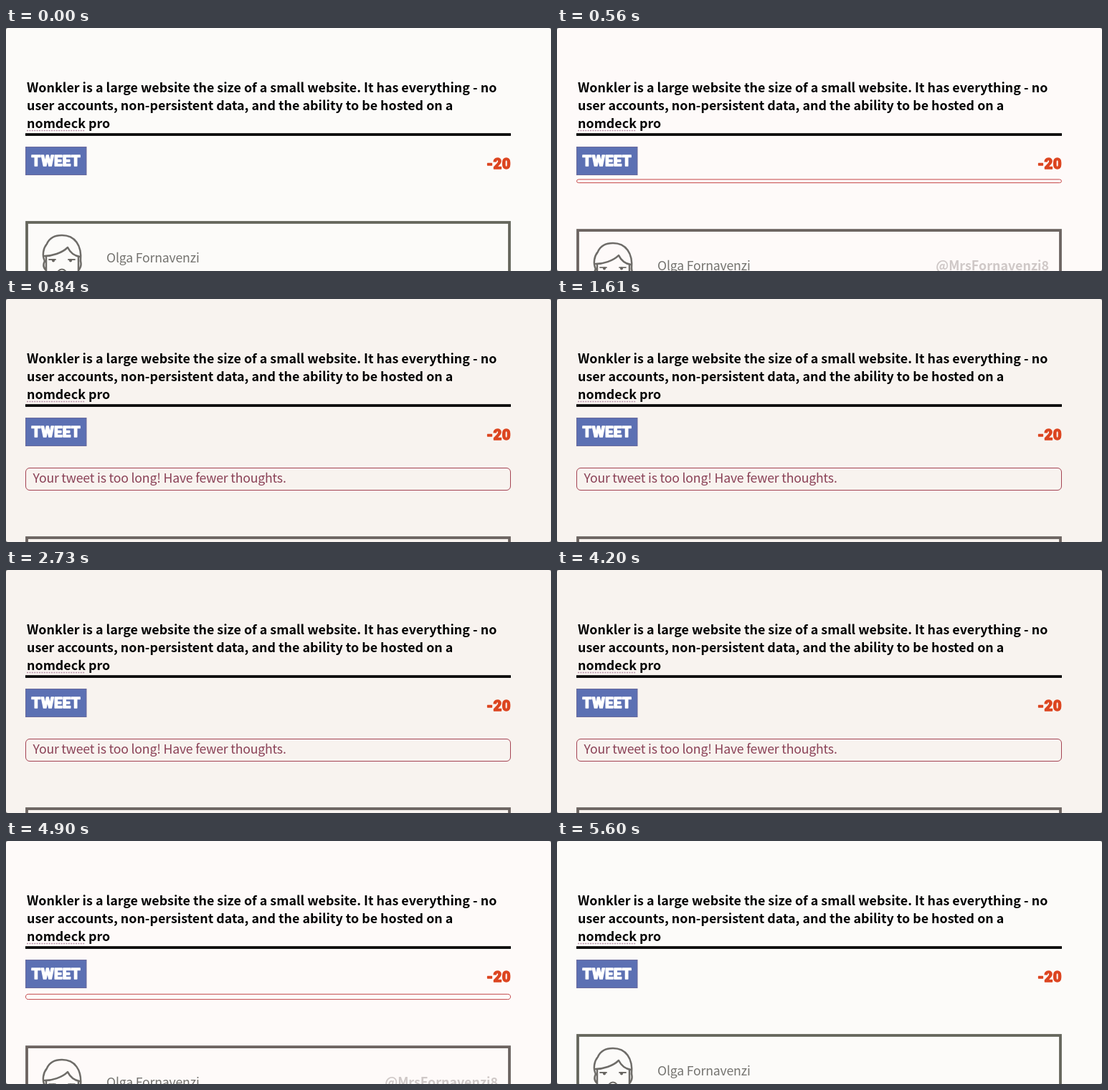
Write an HTML page that moves like this. It is 760 by 340 pixels and loops after 5.67 s.

```html
<!DOCTYPE html>
<html lang="en">
<head>
<meta charset="utf-8">
<title>Message too long</title>
<style>
  html, body { margin: 0; width: 100%; height: 100%; overflow: hidden; background: #777; }
  svg { display: block; width: 760px; height: 340px; border-radius: 3px; }
  text { font: 300 17.7px "Noto Sans CJK SC", "Noto Sans CJK JP", "Noto Sans CJK KR", sans-serif; letter-spacing: -.2px; }
  .bold { font-weight: 700; font-size: 17.88px; letter-spacing: 0; }
  .block { font: 900 20.4px Roboto, sans-serif; letter-spacing: .4px; stroke-width: 1.3; stroke-linejoin: round; }
  .lines { fill: none; stroke: #6e6c68; stroke-width: 2.5; stroke-linecap: round; stroke-linejoin: round; }
</style>
</head>
<body>
<svg id="stage" viewBox="0 0 760 340">
  <clipPath id="noticeClip"><rect id="clipBox" x="28" width="675"/></clipPath>

  <g fill="#000">
    <text class="bold" x="29" y="90">Wonkler is a large website the size of a small website. It has everything - no</text>
    <text class="bold" x="29" y="115">user accounts, non-persistent data, and the ability to be hosted on a</text>
    <text class="bold" x="29" y="140">nomdeck pro</text>
  </g>
  <path d="M29 143.5H110" stroke="#b58fa6" stroke-width="1.6" stroke-dasharray="2 1.4"/>
  <rect x="27" y="147.2" width="677" height="3.7"/>

  <rect x="27.5" y="166.5" width="84.5" height="39" fill="#5c70b3" stroke="#68699c"/>
  <text class="block" x="69.8" y="193" text-anchor="middle" fill="#fff" stroke="#fff">TWEET</text>
  <text class="block" x="704" y="196.6" text-anchor="end" fill="#dc4520" stroke="#dc4520">-20</text>

  <g id="notice">
    <rect id="noticeBox" x="27.5" width="676" fill="none"/>
    <g clip-path="url(#noticeClip)">
      <text id="noticeText" x="37.5" fill="#8a4156">Your tweet is too long! Have fewer thoughts.</text>
    </g>
  </g>

  <g id="card">
    <rect id="cardBox" x="29" y="272" width="673" height="170" fill="none" stroke-width="3.8"/>
    <g class="lines">
      <path d="M54 326C50 318 52 308 57 302C61 293 69 290 78 290C96 290 106 304 104 326"/>
      <path d="M54 319C64 319 78 315 86 307C90 315 96 319 103 320"/>
      <path d="M56 320V342M101 320V342M54 326Q50 334 56 339M104 326Q106 334 101 339"/>
      <path d="M60 324H69M87 324H96M72 341Q78 334 84 341" stroke-width="1.8"/>
    </g>
    <g fill="#65625e"><circle cx="66" cy="325.5" r="2"/><circle cx="90" cy="325.5" r="2"/></g>
    <text x="140" y="328" fill="#74736f">Olga Fornavenzi</text>
    <text id="handle" class="bold" x="686" y="328" text-anchor="end" fill="#cfc8c7">@MrsFornavenzi8</text>
  </g>
</svg>
<script>
  const LOOP = 5670, TICK = 70, SLIDE = 367;
  const $ = id => document.getElementById(id);
  const set = (id, attrs) => {
    for (const name in attrs) $(id).setAttribute(name, attrs[name]);
  };
  const ramp = (t, from, to) => Math.min(1, Math.max(0, (t - from) / (to - from)));
  const swing = x => 0.5 - 0.5 * Math.cos(Math.PI * x);
  const mix = (a, b, k) => a.map((v, i) => v + (b[i] - v) * k);
  const rgb = c => `rgb(${c.map(Math.round)})`;

  const COOL = [252, 251, 249], PINK = [254, 250, 249], BEIGE = [248, 243, 239];

  function draw(t) {
    const open = swing(ramp(t, 458, 458 + SLIDE)) - swing(ramp(t, 4658, 4658 + SLIDE));
    const warm = ramp(t, 0, 490) - ramp(t, 4900, 5110);
    const beige = ramp(t, 560, 630) - ramp(t, 4550, 4830);

    $('stage').style.background = rgb(mix(mix(COOL, PINK, warm), BEIGE, beige));

    const top = 206 + 30 * open, height = 32 * open;
    $('notice').style.display = height > 1 ? '' : 'none';
    set('noticeBox', {
      y: top + 0.5,
      height: Math.max(0, height - 1),
      rx: Math.min(5.5, height / 2),
      stroke: rgb(mix([205, 72, 70], [164, 66, 82], open))
    });
    set('clipBox', { y: top + 1, height: Math.max(0, height - 3) });
    set('noticeText', { y: top + 21 });

    set('card', { transform: `translate(0 ${62 * open})` });
    set('cardBox', { stroke: rgb(mix([101, 102, 92], [108, 100, 97], warm)) });
    set('handle', { opacity: ramp(t, 70, 560) - ramp(t, 4900, 5180) });
  }

  const start = performance.now();
  function frame() {
    const t = (performance.now() - start) % LOOP;
    draw(Math.floor(t / TICK) * TICK);
    requestAnimationFrame(frame);
  }
  frame();
</script>
</body>
</html>
```
